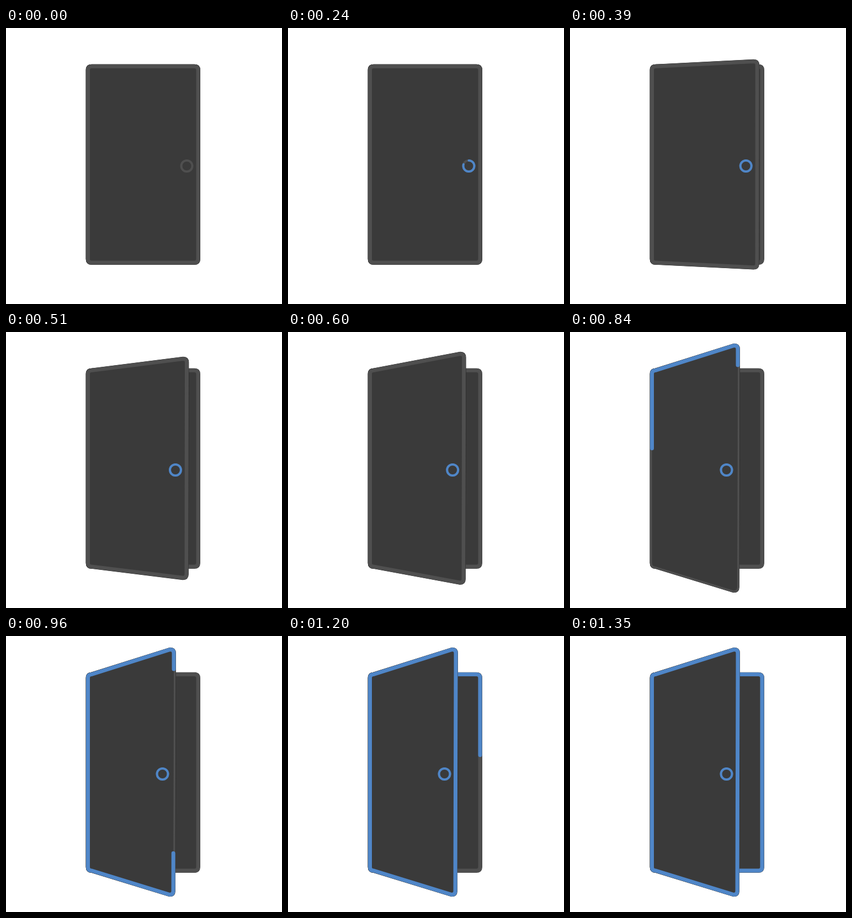
An HTML page that plays this animation: 500x500 px, repeating every 1.44 s.

```html
<!DOCTYPE html>
<html lang="en">
<head>
<meta charset="utf-8">
<title>Opening door</title>
<style>
  html, body { margin: 0; width: 100%; height: 100%; overflow: hidden; background: #fff; }
  svg { display: block; width: 100vw; height: 100vh; }
  path { fill: none; stroke-width: 7; stroke-linecap: round; }
  .edge { stroke: #1c1c1c; stroke-width: 7.7; }
  .fill { fill: #3a3a3a; }
  .grey { stroke: #4f4f4f; }
  .blue { stroke: #4f86c8; }
  .ring { stroke-width: 4; }
</style>
</head>
<body>
<svg viewBox="0 0 500 500">
  <g id="frame">
    <path class="edge"/><path class="fill"/><path class="grey"/>
  </g>
  <path id="frameLine" class="blue" pathLength="1"
        d="M245 69.5H341.5Q348 69.5 348 76V418.5Q348 425 341.5 425H308"/>
  <g id="door">
    <path class="edge"/><path class="fill"/><path class="grey"/><path class="fill" id="cover"/>
    <path id="doorLine" class="blue" pathLength="1"/>
  </g>
  <g id="knob">
    <path class="grey ring" d="M0 -10A10 10 0 0 1 0 10A10 10 0 0 1 0 -10Z"/>
    <path id="knobLine" class="blue ring" pathLength="1" d="M0 -10A10 10 0 0 1 0 10A10 10 0 0 1 0 -10"/>
  </g>
</svg>
<script>
const LOOP = 1440, STEP = 30;
const $ = id => document.getElementById(id);
const progress = (t, from, to) => Math.min(1, Math.max(0, (t - from) / (to - from)));

// Rounded panel hinged on the left; open runs from 0 (shut) to 1 (ajar).
function panel(open) {
  const top = 69.5 - 45 * open, bottom = 425 + 43.5 * open;
  const rt = 348 - 44 * open, rb = 348 - 45 * open, r = 6.5;
  return `M${rt} ${top + 35.5}L${rt} ${top + r}Q${rt} ${top} ${rt - r} ${top}` +
    `L155 69.5Q148.5 69.5 148.5 76V418.5Q148.5 425 155 425` +
    `L${rb - r} ${bottom}Q${rb} ${bottom} ${rb} ${bottom - r}Z`;
}

function setShape(group, d) {
  for (const path of $(group).querySelectorAll("path")) path.setAttribute("d", d);
}

function trace(id, amount) {
  const line = $(id);
  line.style.visibility = amount > 0 ? "visible" : "hidden";
  line.style.strokeDasharray = amount < 1 ? `${amount} 2` : "none";
}

function draw(now) {
  const t = Math.floor((now % LOOP) / STEP) * STEP;
  const open = progress(t, 300, 750);
  setShape("door", panel(open));
  $("knob").setAttribute("transform", `translate(${327.5 - 44 * open} 250)`);
  $("cover").style.visibility = t > 750 ? "visible" : "hidden";
  trace("knobLine", progress(t, 0, 300));
  trace("doorLine", progress(t, 750, 1050));
  trace("frameLine", progress(t, 1050, 1350));
}

setShape("frame", panel(0));
const start = performance.now();
function tick() {
  draw(performance.now() - start);
  requestAnimationFrame(tick);
}
tick();
</script>
</body>
</html>
```
